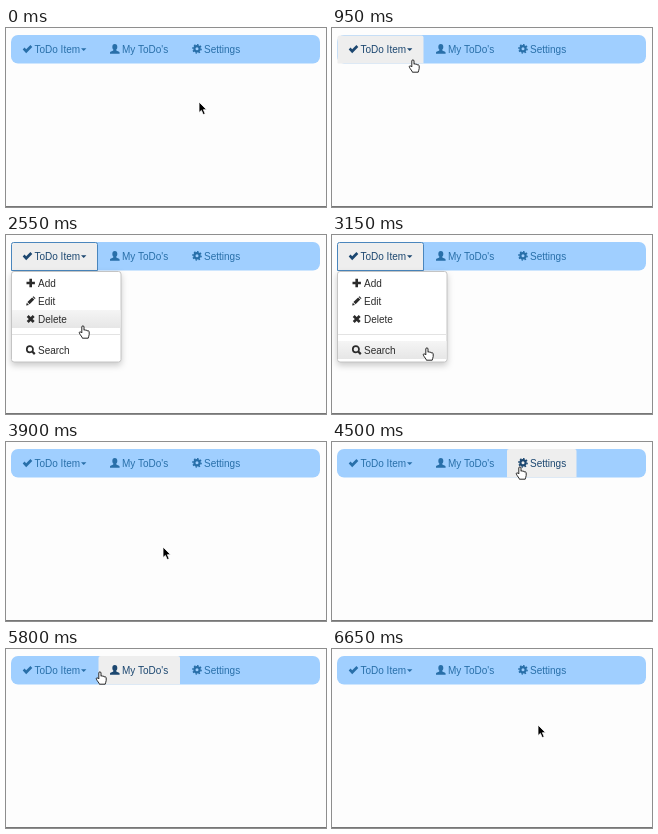
Animation of 320x179 px, one loop 6.8 s. Source, as an HTML page:

```html
<!DOCTYPE html>
<html lang="en">
<head>
<meta charset="utf-8">
<title>ToDo navigation</title>
<style>
  html, body { margin: 0; height: 100%; overflow: hidden; background: #fdfdfd; }
  svg { display: block; width: 100vw; height: 100vh; }
  text { font: 10px "Liberation Sans", Arial, sans-serif; }
  .tab { fill: #286fa9; color: #286fa9; }
  .tab .back, .item .back { fill: none; }
  .tab.hot, .tab.open { fill: #1c4770; color: #1c4770; }
  .tab.hot .back, .tab.open .back { fill: #eee; }
  .tab.open .back { stroke: #4a86bd; }
  .item { fill: #2b2b2b; color: #2b2b2b; }
  .item.hot .back { fill: url(#shade); }
  .line { fill: none; stroke: currentColor; }
  .panel { fill: #fff; stroke: #c4c4c4; filter: drop-shadow(0 3px 3px rgba(0, 0, 0, .2)); }
  .hidden { display: none; }
</style>
</head>
<body>
<svg viewBox="0 0 320 179" preserveAspectRatio="none">
  <defs>
    <linearGradient id="shade" x2="0" y2="1">
      <stop stop-color="#f5f5f5"/><stop offset="1" stop-color="#e6e6e6"/>
    </linearGradient>
  </defs>
  <rect y="178" width="320" height="1" fill="#777"/>
  <rect x="5" y="7" width="309" height="28.5" rx="7" fill="#a0cfff"/>

  <g class="tab" data-box="5 7 91.5 35.5">
    <path class="back" d="M5.5 35.5V9.5a2 2 0 0 1 2-2H89.5a2 2 0 0 1 2 2V35.5Z"/>
    <path transform="translate(21.5 21)" d="M-4.8 .4-3-1.4-1.3 .2 2.9-3.9 4.8-2.1-1.3 4.2Z"/>
    <text x="28.5" y="24.7">ToDo Item</text>
    <path d="M75 20.3h5.4l-2.7 2.7Z"/>
  </g>
  <g class="tab" data-box="92 7 174 35.5">
    <path class="back" d="M92.5 35.5V9a2 2 0 0 1 2-2H172a2 2 0 0 1 2 2V35.5Z"/>
    <g transform="translate(108.8 21)">
      <ellipse cy="-2" rx="2.5" ry="2.9"/>
      <path d="M-4.8 4.7V3.6C-4.8 2.4-1.5 2-1.3 1V0H1.3V1C1.5 2 4.8 2.4 4.8 3.6V4.7Z"/>
    </g>
    <text x="116" y="24.7">My ToDo's</text>
  </g>
  <g class="tab" data-box="175 7 244.5 35.5">
    <path class="back" d="M175 35.5V9a2 2 0 0 1 2-2H242.5a2 2 0 0 1 2 2V35.5Z"/>
    <g class="line" transform="translate(191 20.8)">
      <circle r="2.6" stroke-width="2.2"/>
      <circle r="4.1" stroke-width="1.5" pathLength="8" stroke-dasharray=".5"/>
    </g>
    <text x="198" y="24.7">Settings</text>
  </g>

  <g id="menu" class="hidden">
    <rect class="panel" x="5.5" y="36.5" width="109.5" height="90.5" rx="2.5"/>
    <path d="M6 99.5H114.5" stroke="#e3e3e3"/>
    <g class="item" data-box="6 39 114.5 57">
      <rect class="back" x="6" y="39" width="108.5" height="18"/>
      <path transform="translate(24.7 48)" d="M-1.3-4.2h2.6v2.9h2.9v2.6h-2.9v2.9h-2.6v-2.9h-2.9v-2.6h2.9Z"/>
      <text x="32" y="51.6">Add</text>
    </g>
    <g class="item" data-box="6 57 114.5 75">
      <rect class="back" x="6" y="57" width="108.5" height="18"/>
      <path transform="translate(24.7 66)" d="M-4.6 4.6-3.9 1.7-1.7 3.9ZM-3.3 1.1 1.4-3.6 3.6-1.4-1.1 3.3ZM1.9-4.1 2.8-4.8 4.8-2.8 4.1-1.9Z"/>
      <text x="32" y="69.6">Edit</text>
    </g>
    <g class="item" data-box="6 75 114.5 93">
      <rect class="back" x="6" y="75" width="108.5" height="18"/>
      <path class="line" transform="translate(24.7 84)" stroke-width="2.7" d="M-3-3 3 3M3-3-3 3"/>
      <text x="32" y="87.6">Delete</text>
    </g>
    <g class="item" data-box="6 106 114.5 124">
      <rect class="back" x="6" y="106" width="108.5" height="18"/>
      <g class="line" transform="translate(24.7 115)">
        <circle cx="-.8" cy="-.8" r="3.1" stroke-width="1.7"/>
        <path stroke-width="2.2" d="M1.5 1.5 4.1 4.1"/>
      </g>
      <text x="32" y="118.6">Search</text>
    </g>
  </g>

  <g id="pointer">
    <path id="arrow" fill="#000" stroke="#fff" stroke-width=".8" d="M0 0V10.6L2.4 8.4 4.2 12.6 6.2 11.7 4.4 7.7H7.6Z"/>
    <path id="hand" fill="#fff" stroke="#111" stroke-width=".9" stroke-linejoin="round"
      d="M-1.2 7V1a1.1 1.1 0 0 1 2.2 0V4.3C1.4 3.5 2.8 3.6 3 4.6 3.4 4 4.6 4.2 4.7 5.1 5.2 4.6 6.2 4.9 6.2 5.9V8.5C6.2 10 5.3 10.6 5.2 12.2H-.6C-.8 10.8-2.6 9.4-3.6 7.2-4.2 5.8-2.6 5.2-1.2 7Z"/>
  </g>
</svg>
<script>
  const LOOP = 6800, STEP = 50, OPEN = 1300, CLOSE = 3500;
  // Pointer stops: time, x, y
  const stops = [
    [0, 193, 74], [450, 193, 74], [950, 81, 32], [1100, 76, 27], [1300, 76, 27],
    [1600, 73, 48], [1900, 74, 65], [2250, 76, 82], [2550, 77, 91],
    [2800, 78, 112], [3050, 84, 114], [3450, 157, 105], [3900, 157, 105],
    [4250, 153, 30], [4500, 188, 25], [4550, 188, 25], [5150, 208, 26],
    [5300, 204, 26], [5800, 94, 23], [5950, 76, 23], [6050, 80, 24],
    [6300, 140, 31], [6650, 206, 76], [LOOP, 206, 76]
  ];
  const get = id => document.getElementById(id);
  const menu = get("menu"), pointer = get("pointer"), arrow = get("arrow"), hand = get("hand");
  const targets = [...document.querySelectorAll("[data-box]")].map(el => ({
    el, box: el.dataset.box.split(" ").map(Number), inMenu: menu.contains(el)
  }));

  function locate(t) {
    const i = stops.findIndex(stop => stop[0] > t);
    const [t0, x0, y0] = stops[i - 1], [t1, x1, y1] = stops[i];
    const k = (t - t0) / (t1 - t0), ease = k * k * (3 - 2 * k);
    return [x0 + (x1 - x0) * ease, y0 + (y1 - y0) * ease];
  }

  function draw(now) {
    const t = Math.min(Math.floor(now % LOOP / STEP) * STEP, 6650);
    const [x, y] = locate(t);
    const open = t >= OPEN && t < CLOSE;
    let over = false;
    for (const { el, box: [left, top, right, bottom], inMenu } of targets) {
      const hot = (open || !inMenu) && x >= left && x < right && y >= top && y < bottom;
      el.classList.toggle("hot", hot);
      over = over || hot;
    }
    targets[0].el.classList.toggle("open", open);
    menu.classList.toggle("hidden", !open);
    arrow.classList.toggle("hidden", over);
    hand.classList.toggle("hidden", !over);
    pointer.setAttribute("transform", `translate(${Math.round(x)} ${Math.round(y)})`);
  }

  const start = performance.now();
  function tick() {
    draw(performance.now() - start);
    requestAnimationFrame(tick);
  }
  tick();
</script>
</body>
</html>
```
